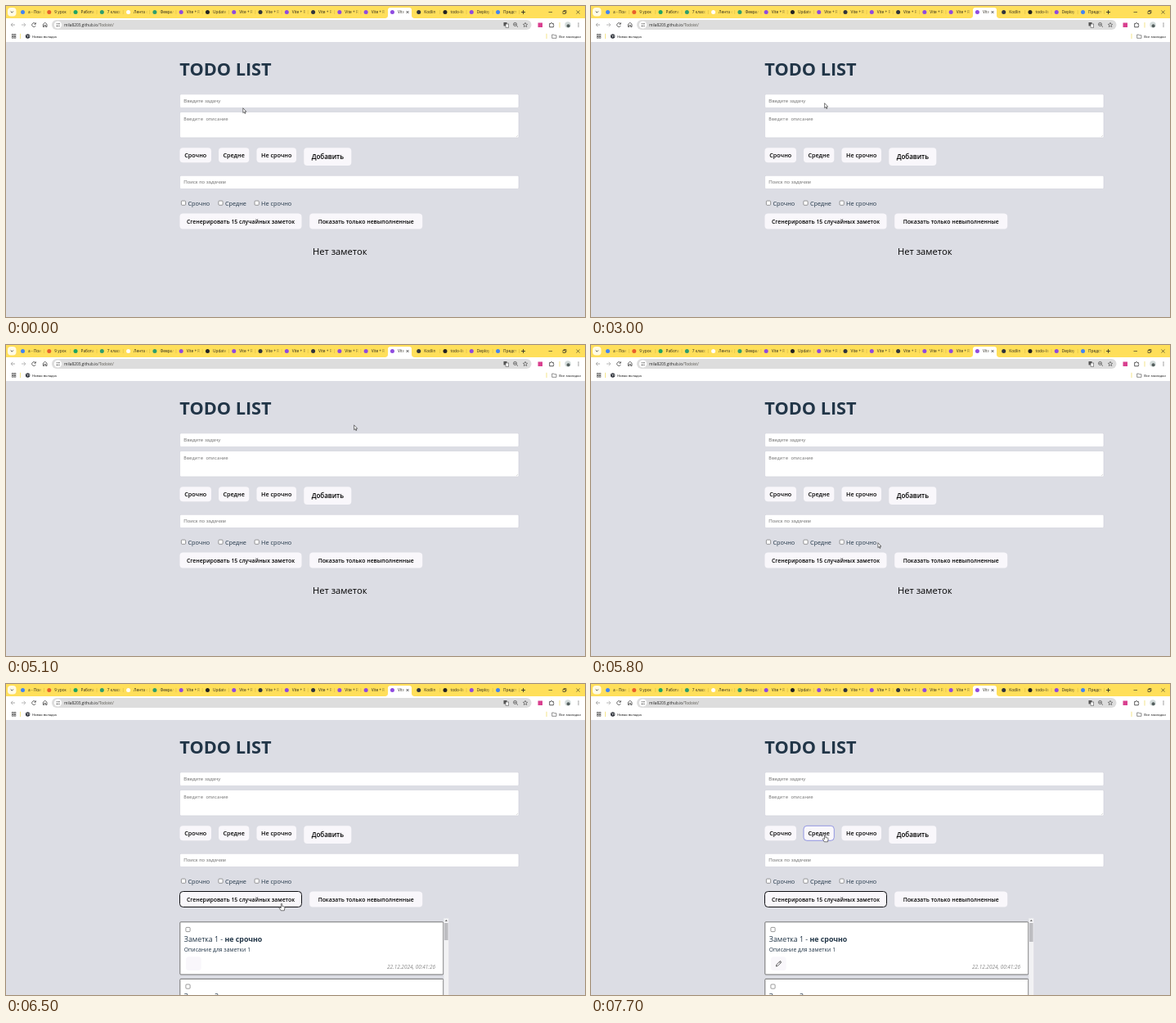
These frames come from a looping animation (708 px wide and 380 px high, 8000 ms). An HTML page:

```html
<!DOCTYPE html>
<html lang="ru">
<head>
<meta charset="utf-8">
<title>Todo list</title>
<style>
  html, body { margin: 0; width: 100%; height: 100%; overflow: hidden; background: #dcdde4; }
  svg { display: block; width: 708px; height: 380px; }
  text { font-family: "Open Sans", "Noto Sans", sans-serif; white-space: pre; }
  .arial { font-family: "Liberation Sans", Arial, sans-serif; }
  .mono { font-family: "Noto Sans Mono", "DejaVu Sans Mono", monospace; }
</style>
</head>
<body>
<svg id="stage" viewBox="0 0 708 380"></svg>
<script>
const NAVY = '#213547', INK = '#000', MUTED = '#757575', PALE = '#f9f7fb';
const YELLOW = '#ffdf5a', PURPLE = '#8f4be0', DARK = '#30343c';

const rect = (x, y, w, h, fill, extra = '') =>
  `<rect x="${x}" y="${y}" width="${w}" height="${h}" fill="${fill}" ${extra}/>`;
const dot = (x, y, r, fill, extra = '') => `<circle cx="${x}" cy="${y}" r="${r}" fill="${fill}" ${extra}/>`;
const line = (d, color = '#444', width = .8, fill = 'none') =>
  `<path d="${d}" stroke="${color}" stroke-width="${width}" fill="${fill}" stroke-linejoin="round"/>`;
const text = (x, y, size, str, fill = INK, extra = '') =>
  `<text x="${x}" y="${y}" font-size="${size}" fill="${fill}" ${extra}>${str}</text>`;
const box = (x, y, w, h) => rect(x, y, w, h, '#fff', 'rx="1.5" stroke="#cfcfd8" stroke-width=".6"');
const checkbox = (x, y) => rect(x - 2.6, y - 2.6, 5.2, 5.2, '#fff', 'rx="1" stroke="#666" stroke-width=".65"');

// Browser window
const tabs = [
  ['а - Пои', '#4285f4'], ['9 урок', '#e8602c'], ['Работа', '#1fa463'], ['7 класс', '#2f9e6e'],
  ['Лента с', '#fff'], ['Феврал', '#2f9e6e'], ['Vite + R', PURPLE], ['Update', '#222'],
  ['Vite + R', PURPLE], ['Vite + R', DARK], ['Vite + R', PURPLE], ['Vite + R', DARK],
  ['Vite + R', PURPLE], ['Vite + R', PURPLE], ['Vite', PURPLE], ['Kodlin', DARK],
  ['todo-lis', '#222'], ['Deploy', PURPLE], ['Предст', '#4285f4']
];
const ACTIVE = 14;

function tab([title, color], i) {
  const x = 20.5 + i * 32.28, active = i === ACTIVE;
  const edge = active || i === ACTIVE - 1 ? '' : line(`M${x + 26} 5V10`, '#c9ad32', .4);
  return dot(x, 7.5, 2.5, color) +
    `<svg x="${x + 5.5}" y="0" width="${active ? 9 : 18}" height="15">${text(1, 9.3, 4.8, title, '#2b281c')}</svg>` +
    rect(x + (active ? 11 : 19), 3, 5, 9, `url(#${active ? 'fadeWhite' : 'fadeYellow'})`) + edge;
}

const fade = (id, color) => `<linearGradient id="${id}"><stop stop-color="${color}" stop-opacity="0"/>` +
  `<stop offset="1" stop-color="${color}"/></linearGradient>`;

const browser =
  `<defs>${fade('fadeYellow', YELLOW)}${fade('fadeWhite', '#fff')}</defs>` +
  rect(0, 0, 708, 15, YELLOW) + rect(0, 15, 708, 29, '#fff') +
  '<path d="M464 15Q467 14.5 467 11.5V5Q467 2 470 2H493Q496 2 496 5V11.5Q496 14.5 499 15Z" fill="#fff"/>' +
  rect(2, 2, 10.5, 10.5, '#fffbe6', 'rx="4"') + line('M5.7 6.5L7.3 8.1L8.9 6.5', '#222') +
  tabs.map(tab).join('') +
  line('M489.5 6L492.5 9M492.5 6L489.5 9', '#222', .7) +
  line('M630 7.5H635M632.5 5V10', '#222') +
  line('M663.5 7.5H668M681 6.5H684V9.5H681ZM682 6.5V5.5H685V8.5H684M697.5 5.5L701.5 9.5M701.5 5.5L697.5 9.5', '#222', .6) +
  line('M11 23H6.3M8.3 20.8L6.1 23L8.3 25.2', '#999') +
  line('M19 23H23.7M21.7 20.8L23.9 23L21.7 25.2', '#aaa') +
  line('M36 21.6A2.4 2.4 0 1 0 36.3 24M36.4 20.3V22.2H34.4') +
  line('M45.4 25.5V22.2L47.7 20.3L50 22.2V25.5H48.6V23.6H46.8V25.5Z') +
  rect(56, 17, 586.5, 12, '#dddddd', 'rx="6"') + dot(63.5, 23, 4.6, '#fff') +
  line('M61.3 21.8H64M61.3 24.4H62.3M63.8 24.4H66', '#444', .6) +
  dot(65, 21.8, .7, '#444') + dot(62.8, 24.4, .7, '#444') +
  text(71, 24.9, 4.75, 'mila8203.github.io<tspan fill="#55534c">/Todoist/</tspan>', '#222') +
  rect(608.5, 20, 4, 4.4, '#555') + rect(611, 22, 3.7, 4.2, '#fff', 'stroke="#555" stroke-width=".6"') +
  line('M624.3 24L626 25.7M621.5 22.4H623.6') + dot(622.5, 22.4, 2, 'none', 'stroke="#444" stroke-width=".7"') +
  line('M635 20.3L635.8 22.1L637.7 22.3L636.3 23.6L636.7 25.5L635 24.5L633.3 25.5L633.7 23.6L632.3 22.3L634.2 22.1Z', '#444', .6) +
  rect(650.5, 20.5, 5.5, 5.5, '#d9408f') +
  line('M664.7 21.5H666.2Q667 19 667.9 21.5H669.3V23Q671 23.8 669.3 24.6V25.8H664.7Z', '#333', .8) +
  line('M677 20V26.5', '#f0d85a', .7) +
  dot(687, 23, 3.7, '#d3dbda') + dot(687.6, 24.2, 2, '#55605f') +
  [21, 23, 25].map(y => dot(700, y, .6, '#333')).join('') +
  [0, 1, 2, 3].map(i => rect(7.3 + i % 2 * 2.7, 34.6 + (i >> 1) * 2.7, 1.9, 1.9, 'none', 'stroke="#444" stroke-width=".6"')).join('') +
  line('M17.5 33.8V40M661 33.8V40', '#f0d85a', .7) +
  dot(26.6, 37, 2.7, DARK) + line('M25 35.8L27 36.5L26.2 38.4M28 35.6L28.5 37.4', '#fff', .6) +
  text(32, 38.6, 4.2, 'Новая вкладка', '#111') +
  line('M667.7 35H669.8L670.5 35.8H673V39.3H667.7Z', '#444', .6) +
  text(676.3, 38.6, 4.2, 'Все закладки', '#111');

// Page
const buttons = [
  [212.5, 173.3, 38.5, 18, 7.2, 'Срочно'],
  [260, 173.3, 37.3, 18, 7.2, 'Средне'],
  [306.5, 173.3, 48.5, 18, 7.2, 'Не срочно'],
  [364.3, 173.3, 58, 21.7, 8, 'Добавить'],
  [212.5, 253.5, 149, 19, 6.85, 'Сгенерировать 15 случайных заметок'],
  [371.2, 253.5, 138, 19, 6.85, 'Показать только невыполненные']
];
const GENERATE = 4;
const button = ([x, y, w, h, size, label]) => rect(x, y, w, h, PALE, 'rx="4" class="button"') +
  text(x + w / 2, y + h / 2 + size * .37, size, label, INK, 'font-weight="600" text-anchor="middle"');

const page =
  text(212.3, 85.3, 21.7, 'TODO LIST', NAVY, 'font-weight="700"') +
  box(212.6, 107.8, 414.4, 16.6) + text(217.3, 118, 6.2, 'Введите задачу', MUTED, 'class="arial"') +
  box(212.6, 129.5, 414.4, 31.4) + text(217.3, 139.8, 5.67, 'Введите описание', MUTED, 'class="mono"') +
  line('M624 160L626 158', '#aaa', .4) +
  box(212.6, 207.3, 414.4, 16.2) + text(217.3, 217.3, 6.2, 'Поиск по задачам', MUTED, 'class="arial"') +
  buttons.map(button).join('') +
  [[217, 'Срочно'], [262.5, 'Средне'], [306.7, 'Не срочно']].map(([x, label]) =>
    checkbox(x, 240.7) + text(x + 5.4, 243.7, 7.3, label, NAVY)).join('');

const note = (n, y, priority) =>
  rect(212.8, y, 322, 64.2, '#fff', 'rx="1" stroke="#555" stroke-width=".8"') +
  checkbox(222.5, y + 9.2) +
  text(217.8, y + 24.3, 8.8, `Заметка ${n} - <tspan font-weight="700">${priority}</tspan>`, NAVY) +
  text(217.8, y + 35.8, 6.84, `Описание для заметки ${n}`, NAVY) +
  rect(220, y + 42.5, 18.7, 16.8, PALE, 'rx="3.5"') +
  text(525, y + 56.8, 6.4, '22.12.2024, 00:41:26', '#888', 'font-style="italic" text-anchor="end"');

const list =
  note(1, 290.8, 'не срочно') + note(2, 360.4, 'средне') +
  rect(535.4, 286.3, 5.8, 94, '#f2f2f4') +
  '<path d="M536.8 290L538.3 288L539.8 290Z" fill="#666"/>' +
  '<rect id="thumb" x="536" y="292" width="4.6" height="21" fill="#bdbdc1"/>' +
  `<g id="pencil">${line('M226.4 345L226.9 342.9L231 338.7Q232.2 338.3 232.5 340.2L228.4 344.4ZM230.2 339.6L231.7 341', '#222', .7)}</g>`;

const arrow = 'M0 0V5.9L1.4 4.7L2.3 6.8L3.2 6.4L2.3 4.4H4.1Z';
const hand = 'M-.7 .4Q0 -.5 .7 .4V3.3L3 3.7Q4 4 3.9 5L3.3 8.5H-.9L-2.9 5.3Q-2.8 4.2 -1.8 4.6L-.7 5.4Z';

const $ = id => document.getElementById(id);
$('stage').innerHTML = rect(0, 0, 708, 380, '#dcdde4') + browser + page +
  `<g id="empty">${text(408.3, 303.7, 11.2, 'Нет заметок', INK, 'text-anchor="middle"')}</g>` +
  `<g id="list">${list}</g>` +
  '<path id="cursor" fill="#fff" stroke="#222" stroke-width=".6" stroke-linejoin="round"/>';
const buttonShapes = document.querySelectorAll('.button');

// Pointer moves: start, end, destination
const moves = [
  [700, 800, 285.6, 118.7],
  [4200, 4600, 316.3, 128],
  [4700, 4800, 316.6, 128.4],
  [5000, 5100, 425.6, 97.8],
  [5200, 6000, 337, 268.3],
  [6800, 7500, 286.2, 184.3]
];
const ease = p => p * p * (3 - 2 * p);

function pointerAt(t) {
  let x = 289.8, y = 124.7;
  for (const [start, end, toX, toY] of moves) {
    const p = ease(Math.min(1, Math.max(0, (t - start) / (end - start))));
    x += (toX - x) * p;
    y += (toY - y) * p;
  }
  return [x, y];
}

const show = (id, on) => $(id).setAttribute('visibility', on ? 'inherit' : 'hidden');

function draw(now) {
  const t = Math.floor(now % 8000 / 100) * 100;
  const [px, py] = pointerAt(t);
  const hovered = buttons.findIndex(([x, y, w, h]) => px >= x && px <= x + w && py >= y && py <= y + h);

  buttonShapes.forEach((shape, i) => {
    const focused = i === GENERATE && t >= 6300;
    shape.setAttribute('stroke', focused ? '#101014' : i === hovered ? '#7b80dd' : 'none');
    shape.setAttribute('stroke-width', focused ? 1 : .8);
  });
  show('empty', t < 6500);
  show('list', t >= 6500);
  show('pencil', t >= 6600);
  $('thumb').setAttribute('height', t < 6600 ? 21 : 23);
  $('cursor').setAttribute('d', hovered < 0 ? arrow : hand);
  $('cursor').setAttribute('transform', `translate(${px} ${py})`);
}

const begin = performance.now();
function loop() {
  draw(performance.now() - begin);
  requestAnimationFrame(loop);
}
loop();
</script>
</body>
</html>
```
